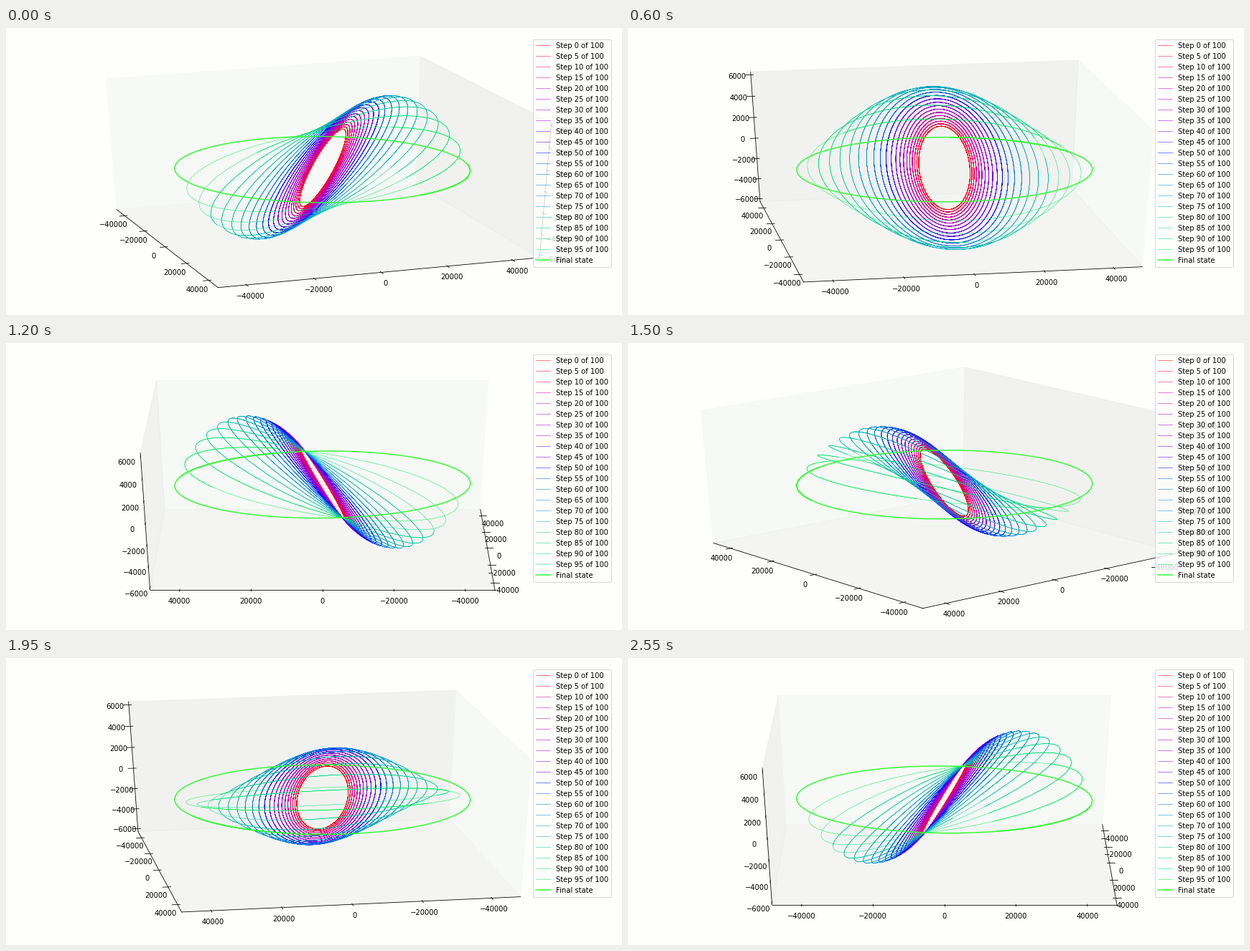
Animation, 858 px wide and 401 px high, one loop 2700 ms. Source, as a matplotlib script:

```python
import matplotlib.pyplot as plt
import numpy as np
from matplotlib.animation import FuncAnimation
from matplotlib.patches import Polygon

W, H, DPI = 858, 401, 72
FRAMES, INTERVAL = 18, 150
BG = "#fefefc"

# View: perspective camera turning around a unit cube
ELEV = np.radians(30)
DIST = 10
LEFT, BOTTOM, AX_W, AX_H = 11, 391.35, 837, 380.52
SX, SY = AX_W / 0.185, AX_H / 0.185
CX, CY = LEFT + 0.095 * SX, BOTTOM - 0.095 * SY

# Low-thrust transfer with a constant yaw law, in km and km/s
MU = 398600.0
R0, R1 = 7378.0, 42164.0
INC0, DINC = np.radians(28), np.radians(28.16)
V0, V1 = np.sqrt(MU / R0), np.sqrt(MU / R1)
TURN = np.pi / 2 * DINC
DV = np.sqrt(V0**2 + V1**2 - 2 * V0 * V1 * np.cos(TURN))
BETA = np.arctan2(np.sin(TURN), V0 / V1 - np.cos(TURN))

# Every orbit is traced for the same time, so the fast ones overlap themselves
TRACE = 100000.0
THETA0 = np.radians(20)


def orbit(t):
    """Radius and inclination after fraction t of the transfer."""
    dv = DV * t
    v2 = V0**2 - 2 * V0 * dv * np.cos(BETA) + dv**2
    turned = np.arctan((dv - V0 * np.cos(BETA)) / (V0 * np.sin(BETA)))
    return MU / v2, INC0 - 2 / np.pi * (turned + np.pi / 2 - BETA)


def trace(r, inc):
    theta = THETA0 + np.linspace(0, TRACE * np.sqrt(MU / r**3), 1000)
    return r * np.column_stack([
        np.cos(theta),
        np.sin(theta) * np.cos(inc),
        np.sin(theta) * np.sin(inc),
    ])


def blend(t):
    """Red to blue to green, mixed in linear light."""
    mix = [max(0, 1 - 2 * t), max(0, 2 * t - 1), 1 - abs(2 * t - 1)]
    return tuple(np.sqrt(mix))


STEPS = range(0, 100, 5)
orbits = [orbit(s / 100) for s in STEPS] + [orbit(1)]
LIM = 1.1 * R1
ZLIM = max(r * np.sin(i) for r, i in orbits)
SPAN = 2 * np.array([LIM, LIM, ZLIM])
rings = [trace(r, i) / SPAN for r, i in orbits]

# Box, ticks and labels in cube units
EDGE = 0.5 + 1 / 48
DELTA = 1 / 12
LABEL_PAD = 11.5 * 48 / (AX_W + AX_H) * DELTA
FLAT = range(-40000, 40001, 20000)
TICKS = [FLAT, FLAT, range(-6000, 6001, 2000)]
TICK_DIR = [1, 0, 0]
FLIP = [1, 0, 0]
PANE_GREY = [0.95, 0.90, 0.925]


def project(points, azim):
    p = np.atleast_2d(points)
    ca, sa, ce, se = np.cos(azim), np.sin(azim), np.cos(ELEV), np.sin(ELEV)
    depth = DIST - p @ [ca * ce, sa * ce, se]
    x = CX + SX * (p @ [-sa, ca, 0]) / depth
    y = CY - SY * (p @ [-ca * se, -sa * se, ce]) / depth
    return np.column_stack([x, y])


fig = plt.figure(figsize=(W / DPI, H / DPI), dpi=DPI, facecolor=BG)
ax = fig.add_axes([0, 0, 1, 1])
ax.set_xlim(0, W)
ax.set_ylim(H, 0)
ax.axis("off")


def make_pane(grey):
    color = (grey, grey + 0.01, grey, 0.5)
    return ax.add_patch(Polygon(np.zeros((4, 2)), closed=False, lw=1,
                                fc=color, ec=color, zorder=0))


def black_line():
    return ax.plot([], [], color="k", lw=0.8, zorder=1)[0]


panes = [make_pane(g) for g in PANE_GREY]
spines = [black_line() for _ in range(3)]
ticks = [[black_line() for _ in vals] for vals in TICKS]
labels = [
    [ax.text(0, 0, str(v).replace("-", "\u2212"), fontsize=10, color="k",
             family="DejaVu Sans", ha="center", va="top", zorder=1)
     for v in vals]
    for vals in TICKS
]

curves = []
for s in STEPS:
    curves += ax.plot([], [], color=blend(s / 100), lw=0.5, zorder=2,
                      label=f"Step {s} of 100")
curves += ax.plot([], [], color=(0.2, 1, 0.2), lw=1.5, zorder=2,
                  label="Final state")

ax.legend(loc="upper right", bbox_to_anchor=(LEFT + AX_W, BOTTOM - AX_H),
          bbox_transform=ax.transData, facecolor=BG,
          prop={"family": "DejaVu Sans", "size": 10}).set_zorder(5)


def draw_pane(i, back, azim):
    j, k = [n for n in range(3) if n != i]
    corners = np.full((4, 3), back[i])
    corners[:, j] = np.array([-1, 1, 1, -1]) * EDGE
    corners[:, k] = np.array([-1, -1, 1, 1]) * EDGE
    panes[i].set_xy(project(corners, azim))


def draw_axis(i, back, azim):
    start = back.copy()
    start[FLIP[i]] *= -1
    end = start.copy()
    end[i] *= -1
    spines[i].set_data(*project([start, end], azim).T)

    d = TICK_DIR[i]
    outward = np.sign(start[d])
    for value, tick, label in zip(TICKS[i], ticks[i], labels[i]):
        pos = start.copy()
        pos[i] = value / SPAN[i]
        inner, outer = pos.copy(), pos.copy()
        inner[d] -= 0.1 * outward * DELTA
        outer[d] += 0.2 * outward * DELTA
        tick.set_data(*project([inner, outer], azim).T)

        push = np.sign(start) * LABEL_PAD
        push[i] = 0
        label.set_position(project(pos + push, azim)[0])


def update(n):
    azim = np.radians(-20 * (n + 1))
    # Walls and floor on the side away from the viewer
    back = np.array([
        -EDGE if np.cos(azim) > 0 else EDGE,
        -EDGE if np.sin(azim) > 0 else EDGE,
        -EDGE,
    ])
    for i in range(3):
        draw_pane(i, back, azim)
        draw_axis(i, back, azim)
    for curve, ring in zip(curves, rings):
        curve.set_data(*project(ring, azim).T)
    return curves


anim = FuncAnimation(fig, update, frames=FRAMES, interval=INTERVAL,
                     repeat=True, repeat_delay=0, blit=False)
plt.show()
```
